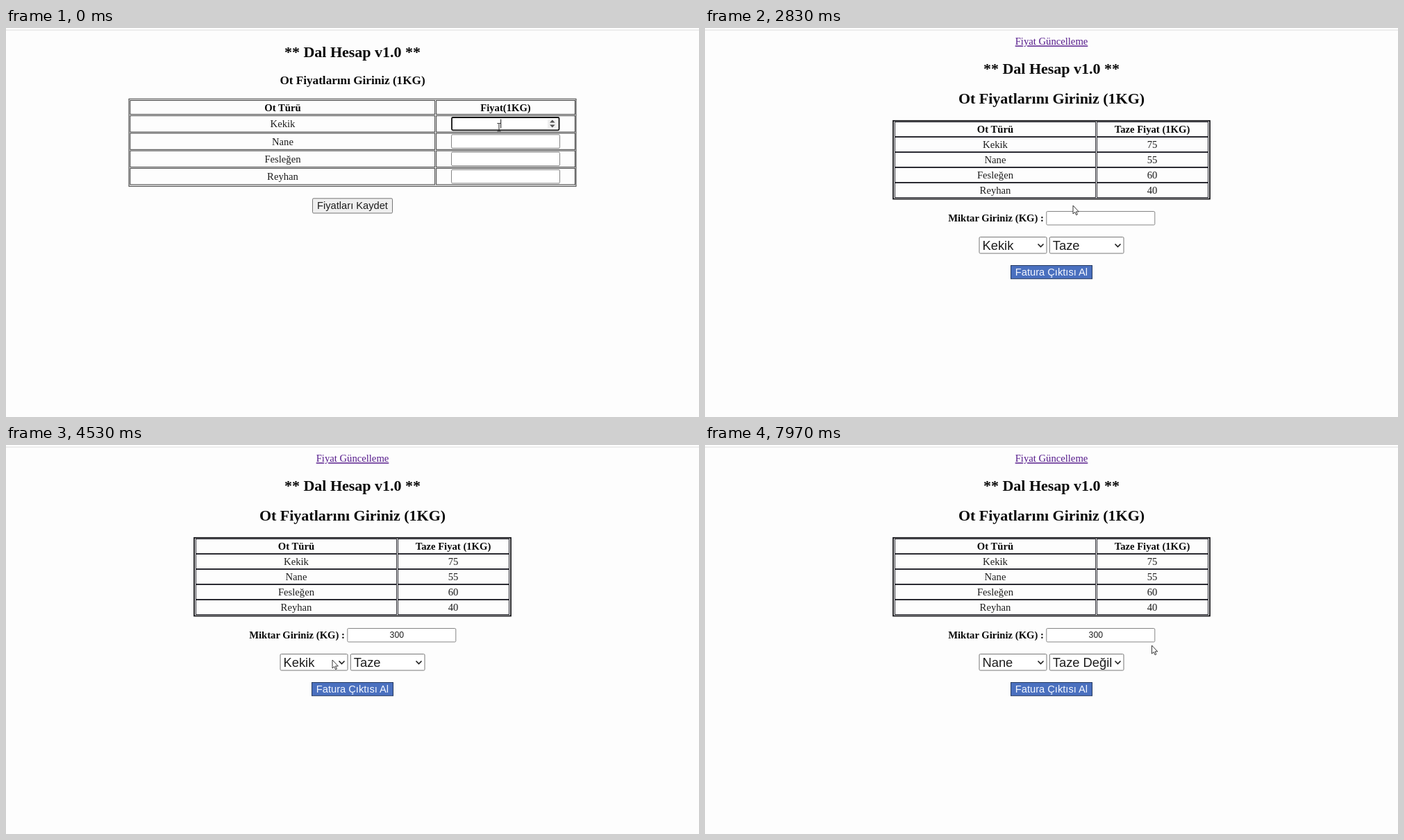
These frames come from a looping animation (998x561 px, 8000 ms). An HTML page:

```html
<!DOCTYPE html>
<html lang="tr">
<head>
<meta charset="utf-8">
<style>
  html, body { margin: 0; width: 100%; height: 100%; overflow: hidden; background: #fdfdfd; }
  svg { display: block; width: 998px; height: 561px; }
  text { font: 14.67px "Liberation Serif", "Times New Roman", serif; fill: #1c1c1c; text-anchor: middle; }
  .bold { font-weight: bold; fill: #080808; }
  .h2 { font-size: 22px; }
  .h3 { font-size: 17.16px; }
  .sans { font-family: "Liberation Sans", Arial, sans-serif; }
  .value { font-size: 12.22px; }
  .choice { font-size: 18.33px; text-anchor: start; }
  .link { fill: #551a8b; text-decoration: underline; }
  .white { fill: #f4f7ff; }
</style>
</head>
<body>
<svg id="stage" viewBox="0 0 998 561"></svg>
<script>
const LOOP = 8000, FIELD_TIME = 610, PAGE_CHANGE = 2800, HERB_CHANGE = 5000, STATE_CHANGE = 7700;
const PRICE_ROW = 25.3, INVOICE_ROW = 22, TRAVEL = 300;
const HERBS = ["Kekik", "Nane", "Fesleğen", "Reyhan"];
const TITLE = "** Dal Hesap v1.0 **";
const HEADING = "Ot Fiyatlarını Giriniz (1KG)";

const makeField = (x, y, value, focus, blur) => ({ x, y, value, focus, blur });
const PRICES = ["75", "55", "60", "40"].map((price, i) =>
  makeField(641, 128 + i * PRICE_ROW, price, i * FIELD_TIME, (i + 1) * FIELD_TIME));
const AMOUNT = makeField(491.3, 264, "300", 3500, 4400);

// Arrival time and place of each pointer stop
const STOPS = [
  ...PRICES.map((field, i) => [i * FIELD_TIME, 710 + 6 * i, field.y + 15]),
  [2300, 688, 243.5], [2560, 530, 256], [3400, 559, 265], [3500, 566, 273],
  [4530, 470, 310], [4860, 446, 346], [5600, 535.5, 248],
  [7400, 556, 312], [7640, 556, 341], [7960, 643.5, 289]
];

const text = (x, y, content, style = "") => `<text x="${x}" y="${y}" class="${style}">${content}</text>`;

const box = (left, top, right, bottom, stroke, fill = "none", width = 1, radius = 0) =>
  `<rect x="${left}" y="${top}" width="${right - left}" height="${bottom - top}" rx="${radius}" fill="${fill}" stroke="${stroke}" stroke-width="${width}"/>`;

const path = (d, style) => `<path d="${d}" ${style}/>`;

function drawField({ x, y, value, focus, blur }, t) {
  const focused = t >= focus && t < blur;
  const count = Math.max(0, Math.min(value.length, Math.floor((t - focus - 80) / 120)));
  const center = x + 71.5, middle = y + 10;
  let out = focused
    ? box(x + 1, y + 1, x + 155.5, y + 19.3, "#101010", "#fff", 1.8, 1.5)
    : box(x + .5, y + .5, x + 156.5, y + 20, "#858585", "#fff", 1, 1.5);
  out += text(center, middle + 4.3, value.slice(0, count), "sans value");
  if (!focused) return out;

  out += `<rect x="${x + 139}" y="${y + 3.5}" width="13" height="13" fill="#efefef"/>`;
  out += path(`M${x + 142} ${middle - 1.5}l3.8-4 3.8 4zm0 3l3.8 4 3.8-4z`, 'fill="#505050"');
  const lastInput = focus + (count ? 80 + count * 120 : 0);
  if ((t - lastInput) % 1000 < 500) {
    const caret = center + count * 3.4 + .2;
    out += path(`M${caret} ${middle - 6.5}v13`, 'stroke="#111"');
  }
  return out;
}

function select(left, right, value) {
  return box(left, 301.5, right, 325, "#777", "#fff", 1, 1.5) +
    text(left + 4.5, 319.8, value, "sans choice") +
    path(`M${right - 12.5} 311.5l4 4 4-4`, 'fill="none" stroke="#222" stroke-width="1.7"');
}

const cellPair = (left, middle, right, top, bottom, color) =>
  box(left, top, middle - 1, bottom, color) + box(middle + 1, top, right, bottom, color);

function pricePage(t) {
  return text(499, 42, TITLE, "bold h2") +
    text(499, 81, HEADING, "bold h3") +
    box(177, 102.3, 821, 228.3, "#333") +
    cellPair(178.8, 618.6, 819.5, 104.5, 124.5, "#3a3a3a") +
    text(398.5, 119.5, "Ot Türü", "bold") + text(719.5, 119.5, "Fiyat(1KG)", "bold") +
    PRICES.map((field, i) =>
      cellPair(178.8, 618.6, 819.5, field.y - 1.5, field.y + 22, "#3a3a3a") +
      text(398.5, field.y + 15.4, HERBS[i]) + drawField(field, t)).join("") +
    box(441.5, 245.8, 556.5, 267, "#777", "#efefef", 1, 1.5) +
    text(499, 261.2, "Fiyatları Kaydet", "sans");
}

function invoiceRow(herb, price, i) {
  const top = 135.5 + i * INVOICE_ROW, style = i ? "" : "bold";
  return cellPair(273.5, 563.5, 724.5, top, top + 21, "#2a2a32") +
    text(418, top + 15.8, herb, style) + text(644, top + 15.8, price, style);
}

function invoicePage(t) {
  return text(499, 24.3, "Fiyat Güncelleme", "link") +
    text(499, 66, TITLE, "bold h2") +
    text(499, 109.3, HEADING, "bold h2") +
    box(271, 133.8, 727, 246.5, "#141418", "none", 1.8) +
    invoiceRow("Ot Türü", "Taze Fiyat (1KG)", 0) +
    HERBS.map((herb, i) => invoiceRow(herb, PRICES[i].value, i + 1)).join("") +
    text(419, 279, "Miktar Giriniz (KG) :", "bold") +
    drawField(AMOUNT, t) +
    select(395, 492, t < HERB_CHANGE ? "Kekik" : "Nane") +
    select(496.3, 603, t < STATE_CHANGE ? "Taze" : "Taze Değil") +
    box(440.5, 342.5, 557.5, 361.7, "#24395f", "#4a70bf") +
    text(499, 357, "Fatura Çıktısı Al", "sans white");
}

// The pointer rests at a stop, then eases to the next one just in time
function pointer(t) {
  const index = STOPS.findLastIndex(([time]) => time <= t);
  const [time, x0, y0] = STOPS[index];
  const [arrival, x1, y1] = STOPS[index + 1] || [LOOP + TRAVEL, x0, y0];
  const u = Math.max(0, 1 - (arrival - t) / Math.min(TRAVEL, arrival - time));
  const ease = u * u * (3 - 2 * u);
  const x = x0 + (x1 - x0) * ease, y = y0 + (y1 - y0) * ease;

  const fields = t < PAGE_CHANGE ? PRICES : [AMOUNT];
  const overField = fields.some(f => x > f.x && x < f.x + 157 && y > f.y + 3 && y < f.y + 17);
  const shape = overField && u === 0
    ? path("M-2.5-5.5h2l.5.5.5-.5h2M0-5V5.5M-2.5 6h2l.5-.5.5.5h2", 'fill="none" stroke="#222"')
    : path("M0 0v12l2.7-2.5 1.9 4.2 1.8-.8-1.9-4h3.8z", 'fill="#fff" stroke="#222" stroke-width=".9"');
  return `<g transform="translate(${x} ${y})">${shape}</g>`;
}

const stage = document.getElementById("stage");
function draw(now) {
  const t = now % LOOP;
  stage.innerHTML = path("M0 3h998", 'stroke="#dedede"') +
    (t < PAGE_CHANGE ? pricePage(t) : invoicePage(t)) + pointer(t);
  requestAnimationFrame(draw);
}
draw(0);
</script>
</body>
</html>
```
